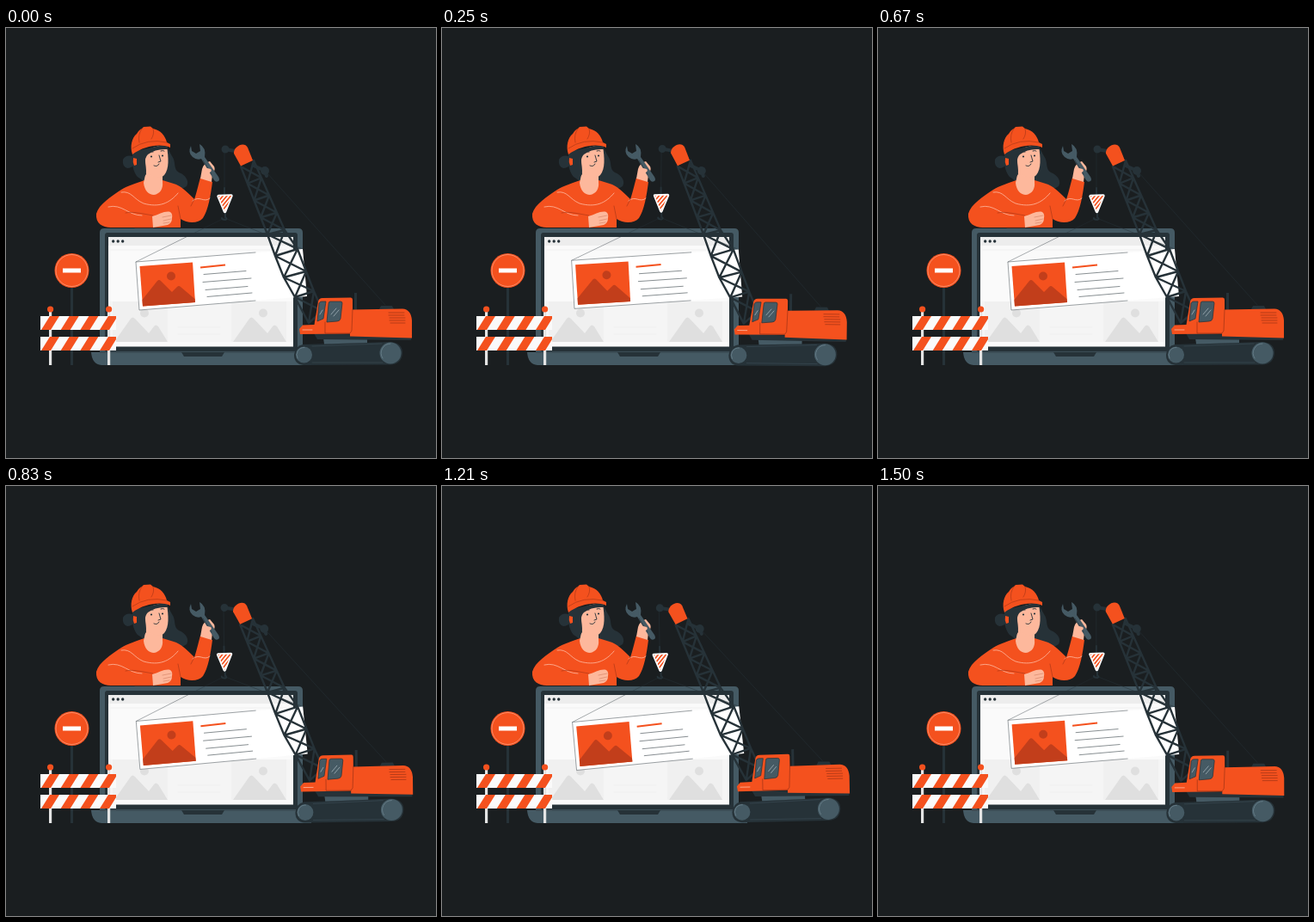
An HTML page for the animation above (1540 ms loop, 500 by 500 pixels).

```html
<!DOCTYPE html>
<html lang="en">
<head>
<meta charset="utf-8">
<title>Under construction</title>
<style>
  html, body { margin: 0; height: 100%; overflow: hidden; background: #1a1e20; }
  svg { display: block; width: 100vw; height: 100vh; }
  .orange { fill: #f4511e; }
  .slate { fill: #455a64; }
  .dark { fill: #263238; }
  .skin { fill: #fdb89c; }
  .line { fill: none; stroke: #263238; stroke-linecap: round; stroke-linejoin: round; }
</style>
</head>
<body>
<svg viewBox="0 0 500 500">
  <defs>
    <g id="board">
      <path fill="#fafafa" d="M40 335h88v16H40z"/>
      <path class="orange" d="M41 351l10-16h11l-10 16zM63.700 351l10-16h11l-10 16zM86.400 351l10-16h11l-10 16zM109 351l10-16h9v3l-8 13z"/>
    </g>
    <g id="placeholder">
      <path fill="#f0f0f0" d="M124 318h64v47h-64z"/>
      <path fill="#dfdfdf" d="M126 365l19-27q2-3 5 0l16 17 6-8q2-3 5 0l11 18z"/>
      <circle cx="161" cy="331.500" r="5" fill="#dfdfdf"/>
    </g>
    <clipPath id="pennant"><path d="M247 195.500L262 195L254.500 213.500z"/></clipPath>
  </defs>

  <g id="woman">
    <path class="dark" d="M149 143C145 154 147 170 156 175Q160 179 166 180L190 183Q203 190 210 184C214 177 207 170 201 168C194 164 198 155 193 149L187 138z"/>
    <path class="dark" d="M147 149Q139 147 136 153Q135 161 141 163Q146 163 149 159z"/>
    <path class="orange" d="M161 177C150 181 142 183 134 188C122 196 108 205 105 216C104 227 112 232 122 232H203V222C212 228 224 227 229 221C235 212 238 195 240 179L226 174C223 185 221 194 219 199C210 190 203 183 195 181L182 177z"/>
    <path class="skin" d="M163 166L160 180C161 189 166 194 172 194C179 193 183 187 182 179V169z"/>
    <path class="skin" d="M161 144Q174 135 187 138C189 150 190 164 184 171C179 176 168 173 163 167z"/>
    <path class="dark" d="M147 144L188 135V141Q174 140 165 147Q161 151 162 158L163 170Q158 178 152 172Q146 160 147 144z"/>
    <path class="orange" d="M148 151l4 1v7l-3 1q-2-4-1-9z"/>
    <path class="orange" d="M147 147C144 138 146 128 152 123Q155 118 158 117L160 115L168 114.500L171 117C180 119 185 125 187 133L191 135V139C179 134 161 137 147 147z"/>
    <path class="line" style="stroke:#a33416" stroke-width=".6" d="M147 140Q164 128 187 133M155 133Q153 124 158 117M169 129Q173 123 171 117"/>
    <path class="line" stroke-width=".9" d="M166 145q3-2 5-1M180 143q3-1 4 0M178 148l2 7-3 1M172 160q4 2 6-2"/>
    <circle cx="169" cy="149.500" r="1.100" class="dark"/>
    <circle cx="182" cy="148.500" r="1.100" class="dark"/>
    <path class="line" style="stroke:#ffc9b5" stroke-width=".7" d="M134 191C146 189 148 199 160 204C178 209 190 204 200 192M119 208C135 204 142 218 158 218M217 201C225 194 230 204 237 198"/>
    <path class="line" style="stroke:#a33416" stroke-width=".6" d="M139 215C149 213 158 216 171 218M219 199l-4 8M203 222l-3-15M150 232h22"/>
    <path class="skin" d="M170 219C178 217 185 212 191 214Q194 216 193 221Q193 227 188 229L171 232z"/>
    <path class="line" style="stroke:#d18064" stroke-width=".6" d="M182 220l10-2M183 224l9-2M183 227l7-1"/>
    <path class="skin" d="M226 175L228 164Q230 157 237 155L242 161Q244 165 240 170L239 179z"/>
    <path class="slate" d="M215 137Q211 145 217 150Q222 154 227 152L242 177Q244 180 247 178Q249 177 247 173L231 150Q233 139 225 135L226 143L221 146L216 143z"/>
    <path class="line" stroke-width=".7" d="M229 154l10 16"/>
    <path class="skin" d="M228 166q3-4 6-3l4 1q2 2-1 4l-8 4z"/>
  </g>

  <g id="laptop">
    <path class="slate" d="M109 378V238q0-5 5-5H340q5 0 5 5V378z"/>
    <path class="dark" d="M115 376V241q0-3 3-3H336q3 0 3 3V376z"/>
    <path fill="#fafafa" d="M119 243H334V370.500H119z"/>
    <path fill="#ededed" d="M119 243H334V253H119z"/>
    <path fill="#f5f5f5" d="M119 318H334V365H119z"/>
    <path class="dark" d="M123 248a1.700 1.700 0 1 0 3.400 0a1.700 1.700 0 1 0-3.400 0m5.500 0a1.700 1.700 0 1 0 3.400 0a1.700 1.700 0 1 0-3.400 0m5.500 0a1.700 1.700 0 1 0 3.400 0a1.700 1.700 0 1 0-3.400 0"/>
    <use href="#placeholder"/>
    <use href="#placeholder" x="138"/>
    <path class="line" style="stroke:#ebebeb" stroke-width=".7" d="M200 348h49M200 356h49M122 258h208"/>
    <path class="slate" d="M99 377H355V392H111Q100 391 99 377z"/>
    <path stroke="#263238" stroke-width=".6" d="M109 377H345"/>
    <path class="dark" d="M204 377H254L251 382H207z"/>
  </g>

  <g id="roadSigns">
    <path class="dark" d="M75 300h3v92h-3z"/>
    <circle cx="76.500" cy="282" r="20" class="orange"/>
    <circle cx="76.500" cy="282" r="18.500" fill="none" stroke="#ffc9b5" stroke-width=".5"/>
    <path fill="#fff" d="M66 279.500h21v5H66z"/>
    <path fill="#e4e4e4" d="M50 329h3.200v63H50zM118 329h3.200v63H118z"/>
    <circle cx="51.600" cy="327" r="3.600" class="orange"/>
    <circle cx="119.600" cy="327" r="3.600" class="orange"/>
    <use href="#board"/>
    <use href="#board" y="24"/>
  </g>

  <g id="crane">
    <path class="line" stroke-width=".5" d="M303 168L441 322M254 141V190M345 257L254 221"/>
    <path class="line" stroke-width=".4" d="M151 272L254 221"/>
    <g id="card">
      <path d="M151 272L345 257L350 312L155 328z" fill="#fff"/>
      <path class="line" stroke-width=".45" d="M290 261L151 272L155 328L290 317"/>
      <path class="orange" d="M155.500 277L217 272.500L220 319L159 323.500z"/>
      <path fill="#c23e1b" d="M159 323.500L158.500 316L176 294Q178 292 180 294L193 307L199 301Q201 299 203 301L219.500 315L220 319z"/>
      <circle cx="192" cy="288.500" r="5" fill="#c23e1b"/>
      <path stroke="#f4511e" stroke-width="2" d="M226 278.500L255 275.500"/>
      <path class="line" stroke-width=".55" d="M230 286.500L279 282.500M229 295.500L285 291M232 304.500L281 300.500M234 312.500L286 308"/>
    </g>
    <path class="line" stroke-width="4" d="M255 141L266 143M288 160L301 166L303 172"/>
    <circle cx="255" cy="141" r="4.500" class="dark"/>
    <circle cx="301" cy="166" r="5" class="dark"/>
    <path id="boom" class="line" stroke-width="2.400"/>
    <path class="orange" d="M265 146C264 138 277 131 281 139L287 154L273 160.500z"/>
    <path class="line" stroke-width="2" d="M254 186v8M255 216v4q3 2 0 3q-4 0-4-2"/>
    <path fill="#fff" stroke="#fff" stroke-width="3.400" stroke-linejoin="round" d="M247 195.500L262 195L254.500 213.500z"/>
    <path clip-path="url(#pennant)" stroke="#f4511e" stroke-width="1.700" d="M243 201l9-11M245 204l14-17M247 207l15-18M249 210l15-18M251 213l13-16M253 216l12-15"/>

    <path class="dark" d="M345 368L447 365Q461 366 461 378Q460 391 447 391.500L346 392Q335 391 335 380Q336 370 345 368z"/>
    <path class="line" style="stroke:#3d4e57" stroke-width=".6" d="M356 370L437 367M356 389L438 389"/>
    <circle cx="346.500" cy="380" r="9.500" class="slate"/>
    <circle cx="447" cy="378" r="12.500" class="slate"/>
    <path class="line" style="stroke:#78909c" stroke-width=".6" d="M339 384a8.500 8.500 0 0 1 8-12.500M438 384a11 11 0 0 1 9-17"/>
    <path class="slate" d="M369 360H420V366L370 367.500z"/>
    <path class="dark" d="M358 355L472 358.500L471 363L362 362zM405 308h3v20h-3zM434 327l2-4h13l2 4z"/>
    <path class="orange" d="M358.500 345L363 318Q364 314 368 314L401 313.500Q403 313.500 403 316V327.500L461 326.500Q471 327 472 340V360.500L400 358.500V355.500L342 356L341 350L345 345.500z"/>
    <path fill="#455a64" stroke="#263238" stroke-width=".7" d="M364 320q1-2 3-2h5l-3 20-7 3zM377 318h12q2 0 2 2l-2 18q-1 3-4 3l-12 1 2-21q0-3 2-3z"/>
    <path class="line" style="stroke:#b0bec5" stroke-width=".7" d="M378 333l6-7M381 335l6-7M365 333l3-5"/>
    <path class="line" style="stroke:#8f2e14" stroke-width=".6" d="M403 327L402 352L400 355H371V342M445 331h18M445 334h18M446 337h18M446 340h18M447 343h17"/>
    <path class="line" style="stroke:#ffc9b5" stroke-width=".7" d="M345 351h11"/>
  </g>
</svg>
<script>
  const PERIOD = 1540, PEAK = 335, SWING = 0.9;
  const crane = document.getElementById('crane');

  // Lattice boom: two chords joined by rungs and crossed braces.
  const leftChord = [[273, 161], [304, 240], [313, 265], [323, 290], [336, 313], [352, 343]];
  const rightChord = [[288, 154], [324, 235], [339, 257], [349, 283], [358, 306], [368, 329]];
  const cells = [4, 1, 1, 1, 1];
  const mix = (a, b, k) => a.map((v, i) => v + (b[i] - v) * k);
  const line = (...points) => 'M' + points.join('L');

  let lattice = line(...leftChord) + line(...rightChord);
  cells.forEach((count, part) => {
    const left = k => mix(leftChord[part], leftChord[part + 1], k / count);
    const right = k => mix(rightChord[part], rightChord[part + 1], k / count);
    for (let k = 0; k < count; k++) {
      lattice += line(left(k), right(k + 1)) + line(right(k), left(k + 1)) +
        line(left(k + 1), right(k + 1));
    }
  });
  document.getElementById('boom').setAttribute('d', lattice);

  function draw() {
    const phase = (performance.now() - PEAK) / PERIOD * 2 * Math.PI;
    const angle = SWING * (Math.cos(phase) - 0.2);
    crane.setAttribute('transform', `rotate(${angle} 300 240)`);
    requestAnimationFrame(draw);
  }
  draw();
</script>
</body>
</html>
```
